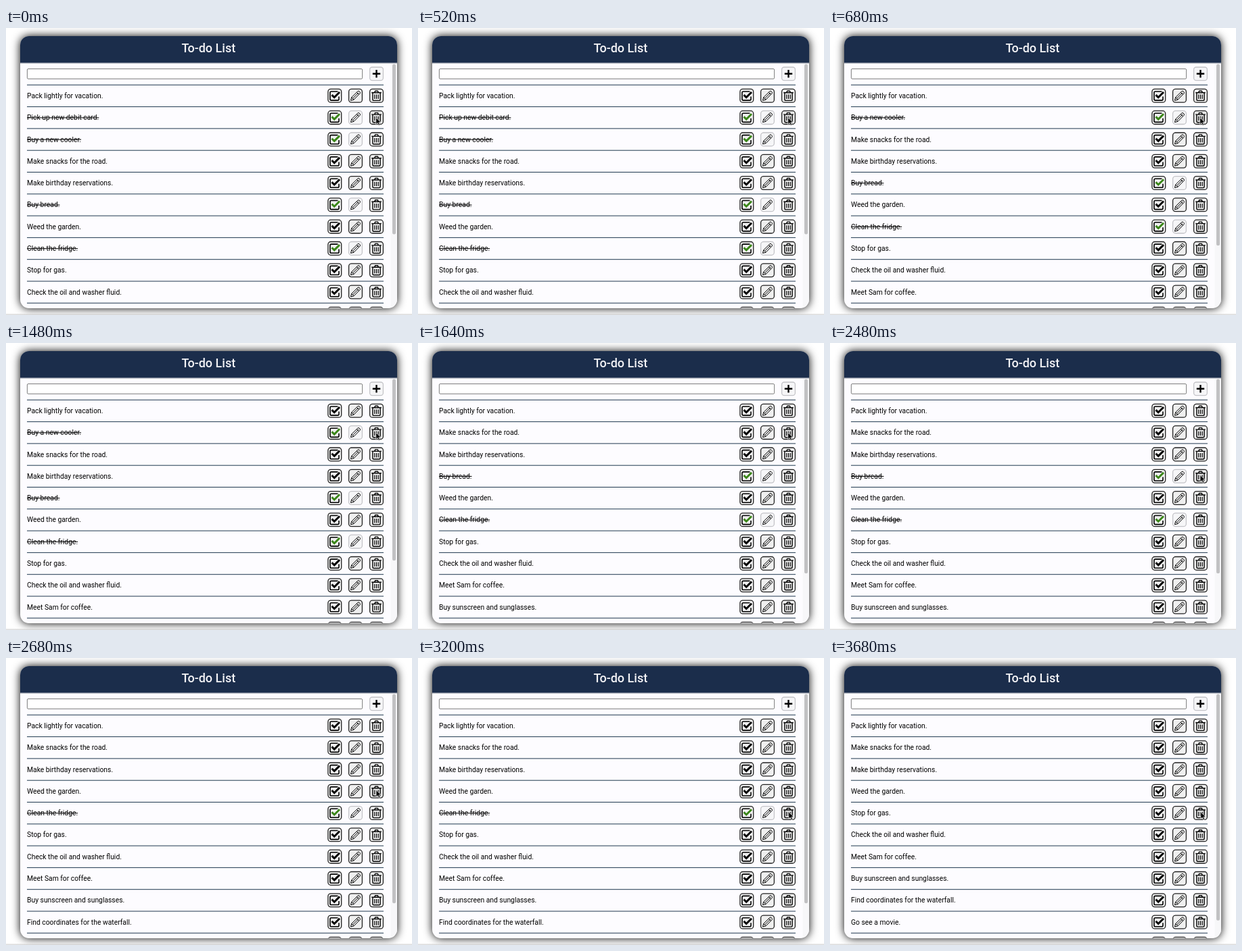
Recreate the animation shown at these times as an HTML page. Size 600 px wide and 425 px high, loop 3.72 s.

```html
<!DOCTYPE html>
<html lang="en">
<head>
<meta charset="utf-8">
<title>To-do List</title>
<style>
  html, body { margin: 0; width: 100%; height: 100%; overflow: hidden; background: #fff; }
  .card { position: absolute; left: 21px; top: 12px; width: 557px; height: 402.5px;
          border-radius: 13px; background: #fdfcff; box-shadow: 0 0 13px #000; }
  svg { position: absolute; left: 0; top: 0; }
  text { font: 10.34px Roboto, sans-serif; fill: #000; }
  .title { font-size: 18px; font-weight: 500; fill: #f3f3f6; text-anchor: middle; }
  .done text { text-decoration: line-through; }
  .done .tick { stroke: #3a8618; }
  .button { fill: #efefef; stroke: #222; stroke-width: 1.3; }
  .hover { fill: #e5e5e5; }
  .done .edit, .add { fill: #f6f6f8; stroke: #c4c4c8; }
  .icon { fill: none; stroke: #000; stroke-linejoin: round; }
</style>
</head>
<body>
<div class="card"></div>
<svg width="600" height="425" viewBox="0 0 600 425">
  <defs>
    <clipPath id="clip"><rect x="21" y="12" width="557" height="402.5" rx="13"/></clipPath>
  </defs>
  <rect y="423.6" width="600" height="1" fill="#c8c8c8"/>
  <g clip-path="url(#clip)">
    <rect x="21" y="51" width="557" height="2" fill="#c9cbd2"/>
    <rect x="21" y="12" width="557" height="39.5" fill="#1b2d4b"/>
    <text class="title" x="299.3" y="36.2">To-do List</text>
    <rect x="568.5" y="53" width="9.5" height="362" fill="#f7f7f9"/>
    <rect id="thumb" x="571" y="53.5" width="5" rx="2.5" fill="#c1c1c3"/>
    <rect x="31.4" y="60.5" width="495.2" height="14.8" rx="1.5" fill="#fff" stroke="#6f6f6f" stroke-width=".9"/>
    <rect class="button add" x="537.6" y="58" width="19.8" height="19.6" rx="3.5"/>
    <path d="M541.8 67.8h11.4M547.5 62.1v11.4" stroke="#000" stroke-width="2.4"/>
    <rect x="31" y="83.8" width="527" height="1" fill="#20394f"/>
    <g id="rows"></g>
  </g>
  <path id="cursor" d="M0 0V10.2L2.4 8L4.1 11.8L5.9 11L4.2 7.3H7.4Z" fill="#000" stroke="#fff" stroke-width=".7"/>
</svg>
<script>
const LOOP = 3720, PITCH = 32.3, FIRST = 100.3;
const items = [
  ["Pack lightly for vacation."],
  ["Pick up new debit card.", 600],
  ["Buy a new cooler.", 1600],
  ["Make snacks for the road."],
  ["Make birthday reservations."],
  ["Buy bread.", 2560],
  ["Weed the garden."],
  ["Clean the fridge.", 3560],
  ["Stop for gas."],
  ["Check the oil and washer fluid."],
  ["Meet Sam for coffee."],
  ["Buy sunscreen and sunglasses."],
  ["Find coordinates for the waterfall."],
  ["Go see a movie."],
  ["Charge the camera."]
];

const button = (x, name, icon) => `<g transform="translate(${x})">
  <rect class="button ${name}" x="-9.9" y="-9.9" width="19.8" height="19.8" rx="4"/>
  <g class="icon">${icon}</g></g>`;

const check = `<path stroke-width="1.6" d="M4.6-6.3H-5Q-6.8-6.3-6.8-4.5V5Q-6.8 6.8-5 6.8H4.4Q6.2 6.8 6.2 5V1.2"/>
  <path class="tick" stroke-width="2.9" stroke-linejoin="miter" d="M-4.3-1.2L-.6 2.5L7.2-5.3"/>`;
const pencil = `<path stroke-width="1" d="M-7 7L-5.8 2.4L3.4-6.6Q4.5-7.5 5.6-6.5L6.5-5.6Q7.5-4.5 6.6-3.4L-2.4 5.8Z
  M-5.8 2.4L-2.4 5.8M-4.1 4.1L4.6-4.6M1.8-5L5-1.8"/>`;
const trash = `<path stroke-width="1.4" d="M-7.2-4.5H7.2M-2.8-4.7L-1.9-7H1.9L2.8-4.7M-5.6-4.3V5.6Q-5.6 7.1-4.1 7.1H4.1Q5.6 7.1 5.6 5.6V-4.3"/>
  <path stroke-width="1.2" d="M-2.7-1.8V4.7M0-1.8V4.7M2.7-1.8V4.7"/>`;

const get = id => document.getElementById(id);
get("rows").innerHTML = items.map(([label, removed]) => `<g class="${removed ? "done" : ""}">
  <text x="31" y="3.6">${label}</text>
  ${button(485.8, "check", check)}${button(516.5, "edit", pencil)}${button(547.5, "trash", trash)}
  <rect x="31" y="15.8" width="527" height="1" fill="#20394f"/></g>`).join("");
const rows = [...get("rows").children];

const progress = (t, start, length) => Math.min(1, Math.max(0, (t - start) / length));
const easeOut = p => 1 - (1 - p) ** 3;
const smooth = p => p * p * (3 - 2 * p);

function draw(now) {
  const t = now % LOOP;
  const down = easeOut(progress(t, 1840, 480)), next = smooth(progress(t, 2920, 260));
  const x = 546.7 + .3 * down + .8 * next, y = 132.5 + 63 * down + 32.5 * next;
  get("cursor").setAttribute("transform", `translate(${x} ${y})`);

  let shown = 0;
  rows.forEach((row, i) => {
    const gone = t >= (items[i][1] ?? LOOP);
    row.style.display = gone ? "none" : "";
    if (gone) return;
    const center = FIRST + PITCH * shown++;
    row.setAttribute("transform", `translate(0 ${center})`);
    row.querySelector(".trash").classList.toggle("hover", Math.abs(y - center) < 10);
  });
  const content = 520 - PITCH * (items.length - shown);
  get("thumb").setAttribute("height", 362 * 362 / content);
  requestAnimationFrame(draw);
}
requestAnimationFrame(draw);
</script>
</body>
</html>
```
